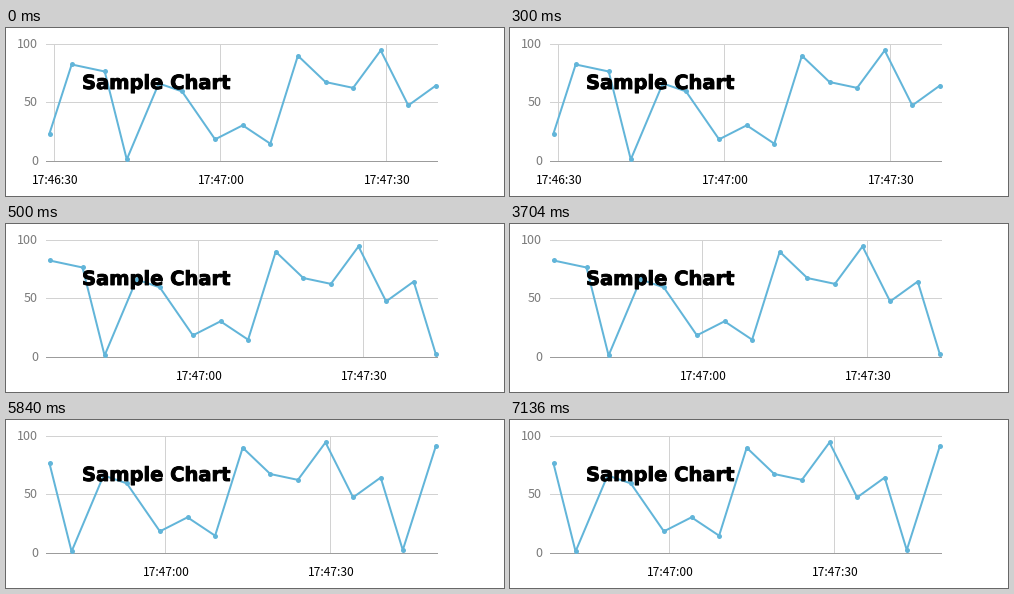
A matplotlib script for the animation above (8 s loop, 498x168 px).

```python
import matplotlib.pyplot as plt
import matplotlib.patheffects as pe
from matplotlib.animation import FuncAnimation

W, H, DPI = 498, 168, 100
STEP = 20                     # ms per frame
LOOP = 8000
LEFT, RIGHT, TOP, BASE = 40, 432, 16, 133
SPAN, X0, PX_PER_S = 70.1, 43.5, 5.52

BLUE, GRID, AXIS, GRAY = "#62b5d9", "#d2d2d2", "#9c9c9c", "#7a7a7a"

# seconds since the first sample, value
TIMES = [0, 4.02, 10, 14, 19.8, 24, 30, 35, 40, 45, 50, 55, 60, 65, 70, 74, 80]
VALUES = [23.5, 82.5, 76.5, 1.3, 66.3, 59.5, 18.5, 30.5, 14.8,
          90, 67.5, 62.5, 94.5, 47.5, 64.5, 2.5, 91.5]
TICKS = [(0.9, "17:46:30"), (30.9, "17:47:00"), (60.9, "17:47:30")]
SCROLLS = [(0, 0), (500, 4.02), (5840, 10)]    # ms, first visible second


def pt(px):
    return px * 72 / DPI


def y_pos(value):
    return BASE - (BASE - TOP) * value / 100


def x_pos(sec, start):
    return X0 + PX_PER_S * (sec - start)


fig = plt.figure(figsize=(W / DPI, H / DPI), dpi=DPI, facecolor="white")
ax = fig.add_axes([0, 0, 1, 1])
ax.set(xlim=(0, W), ylim=(H, 0))
ax.axis("off")

label = dict(family="Noto Sans CJK JP", va="baseline")
thin = dict(lw=pt(1), solid_capstyle="butt", snap=False)

for value, color in ((0, AXIS), (50, GRID), (100, GRID)):
    y = int(y_pos(value)) + 0.5
    ax.plot([LEFT, RIGHT], [y, y], color=color,
            zorder=2 if value == 0 else 1, **thin)
    ax.text(32, y + 3.5, str(value), color=GRAY, ha="right",
            size=pt(12.5), **label)

ticks = []
for sec, name in TICKS:
    rule, = ax.plot([], [], color=GRID, zorder=1, **thin)
    text = ax.text(0, 156, name, color="black", ha="center",
                   size=pt(12), **label)
    ticks.append((sec, rule, text))

curve, = ax.plot([], [], color=BLUE, lw=pt(2), marker="o", ms=pt(5),
                 mew=0, solid_joinstyle="round", snap=False, zorder=3)

ax.text(76, 61, "Sample Chart", family="DejaVu Sans", weight="bold",
        size=pt(19.5), color="black", ha="left", va="baseline", zorder=5,
        path_effects=[pe.withStroke(linewidth=pt(0.9), foreground="black")])


def draw(i):
    now = i * STEP
    start = [sec for ms, sec in SCROLLS if ms <= now][-1]
    shown = [(x_pos(t, start), y_pos(v)) for t, v in zip(TIMES, VALUES)
             if start <= t <= start + SPAN]
    curve.set_data(*zip(*shown))
    for sec, rule, text in ticks:
        x = round(x_pos(sec, start)) + 0.5
        visible = LEFT <= x <= RIGHT
        rule.set_data([x, x], [TOP, BASE])
        text.set_x(x + 0.5)
        rule.set_visible(visible)
        text.set_visible(visible)
    return [curve] + [a for _, *pair in ticks for a in pair]


anim = FuncAnimation(fig, draw, frames=LOOP // STEP, interval=STEP,
                     repeat=True, repeat_delay=0, cache_frame_data=False)
plt.show()
```
